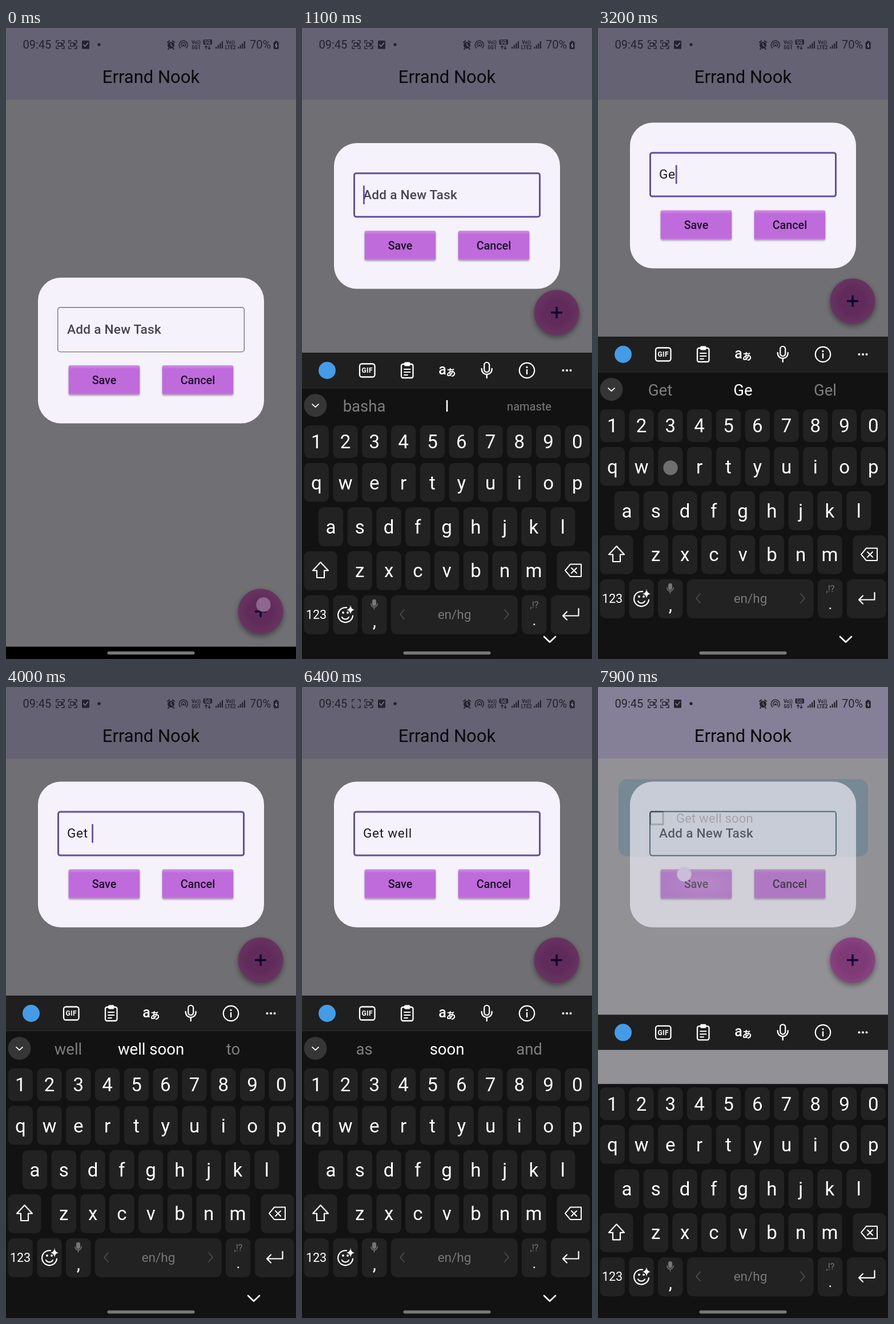
An HTML page for the animation above (8000 ms loop, 508 by 1102 pixels).

```html
<!DOCTYPE html>
<html lang="en">
<head>
<meta charset="utf-8">
<title>Add a task</title>
<style>
  html, body { margin: 0; width: 100%; height: 100%; overflow: hidden; background: #000; }
  svg { display: block; width: 508px; height: 1102px; font-family: Roboto, sans-serif; }
  .line { fill: none; stroke-linecap: round; stroke-linejoin: round; }
  .btn { filter: drop-shadow(0 2px 1.5px #0005); }
  .fab { filter: drop-shadow(0 4px 5px #0006); }
</style>
</head>
<body>
<svg id="stage" viewBox="0 0 508 1102"></svg>
<script>
const LOOP = 8000, STEP = 100;
const stage = document.getElementById('stage');

// Each list runs [time, value], in order of time.
const keyboardY = [[800, 1102], [900, 1058], [1000, 800], [1100, 567], [1200, 546], [1300, 539], [7800, 539], [7900, 572.3]];
const dialogY = [[900, 436], [1000, 325], [1100, 201], [1200, 174], [1300, 165.3]];
const fabY = [[800, 1019], [900, 923], [1000, 690], [1100, 497], [1200, 483], [1300, 477]];
const fading = [[7700, 0], [7800, 0.08], [7900, 0.255]];
const typed = [[0, ''], [2800, 'G'], [3200, 'Ge'], [3500, 'Get'], [3700, 'Get '], [5800, 'Get well '], [6700, 'Get well soon '], [7800, '']];
const hints = [
  [0, ['basha', 'I', 'namaste']], [1900, ['Basha', 'I', 'Namaste']],
  [2800, ['Good', 'G', 'Go']], [3200, ['Get', 'Ge', 'Gel']], [3500, ['Gets', 'Get', 'Getting']],
  [3700, ['well', 'well soon', 'to']], [5800, ['as', 'soon', 'and']], [6700, ['and', 'I', 'to']]
];
const cursorToggles = [700, 1200, 1800, 2200, 2800, 4200, 4900, 5200, 5800, 6400, 6700, 7200, 7700];
// Touches: start, end, x, y, colour
const taps = [
  [0, 200, 451, 1007, '#8f668d'], [700, 800, 255, 530, '#d5cfdf'],
  [1800, 1900, 32, 919], [2800, 2900, 254, 845], [3200, 3300, 127, 768],
  [3500, 3600, 228, 768], [3700, 3800, 267, 997], [5800, 5900, 109, 633],
  [6600, 6700, 254, 633], [7700, 8000, 151, 327, '#c9bdd9']
];

const latest = (list, t) => list.filter(e => e[0] <= t).pop()[1];

function tween(list, t) {
  const i = list.findIndex(e => e[0] > t);
  if (i < 0) return list[list.length - 1][1];
  if (i === 0) return list[0][1];
  const [t0, a] = list[i - 1], [t1, b] = list[i];
  return a + (b - a) * (t - t0) / (t1 - t0);
}

const box = (x, y, w, h, r, fill, more = '') =>
  `<rect x="${x}" y="${y}" width="${w}" height="${h}" rx="${r}" fill="${fill}" ${more}/>`;
const disc = (x, y, r, fill, more = '') => `<circle cx="${x}" cy="${y}" r="${r}" fill="${fill}" ${more}/>`;
const line = (d, color, width = 2.4) => `<path class="line" d="${d}" stroke="${color}" stroke-width="${width}"/>`;
const label = (s, x, y, size, fill, more = 'text-anchor="middle"') =>
  `<text xml:space="preserve" x="${x}" y="${y}" font-size="${size}" fill="${fill}" ${more}>${s}</text>`;
const group = (y, content, more = '') => `<g transform="translate(0 ${y})" ${more}>${content}</g>`;
const medium = 'text-anchor="middle" font-weight="500"';
const bold = 'text-anchor="middle" font-weight="700"';

function app(t) {
  const card = t < 7800 ? '' :
    box(36, 161, 437, 135, 15, '#c6e6f7') +
    box(92, 218, 22, 22, 1, 'none', 'stroke="#222" stroke-width="3"') +
    label('Get well soon', 137, 236.5, 22, '#222', 'letter-spacing=".2"');
  const fab = disc(446, 0, 39.7, 'url(#fab)', 'class="fab"') +
    '<path d="M446-10V10M436 0H456" stroke="#21005d" stroke-width="3.4"/>';
  return box(0, 0, 508, 1102, 0, '#f5f3fb') + box(0, 0, 508, 125, 0, '#ded7fc') +
    card + group(tween(fabY, t), fab);
}

function statusBar(t) {
  const ink = '#25232d', paper = '#77738a';
  const frame = (x, filled) =>
    line(`M${x} 26v-4h4M${x + 10} 22h4v4M${x + 14} 32v4h-4M${x + 4} 36h-4v-4`, ink, 1.5) +
    (filled ? `<path d="M${x + 3} 26h6v6h-6zM${x + 9} 29l3-2.5v5z" fill="none" stroke="${ink}" stroke-width="1.3"/>` : '');
  const bars = x => [0, 1, 2, 3].map(i => box(x + i * 3.6, 33 - i * 3.3, 2.2, 3 + i * 3.3, 0.5, ink)).join('');
  const tiny = (a, b, x) => label(a, x, 28, 8.5, ink, bold) + label(b, x, 36.5, 8.5, ink, bold);
  return label('09:45', 29.5, 36, 20, ink, '') +
    frame(88, t % 1000 < 400 || t % 1000 >= 900) + frame(110, true) +
    box(133, 22, 13, 14.5, 1.5, ink) + line('M136 29l2.5 3 5-6', paper, 1.7) + disc(163, 29, 2.7, ink) +
    disc(289, 30, 6, ink) + line('M283 25l3-2.5M295 25l-3-2.5M285 36l-1 1M293 36l1 1', ink, 2) + line('M289 26.5v4l2.5 1.5', paper, 1.3) +
    line('M305.5 35a7.5 7.5 0 1 1 10.5 0M308 32.5a4 4 0 1 1 5.5 0', ink, 1.5) + disc(310.8, 30.5, 1.8, ink) +
    tiny('Vo))', '5G1', 333) + box(345.5, 20, 15.5, 9, 2, ink) + label('5G', 353, 27.5, 8.5, paper, bold) +
    line('M350.5 37v-6l-2 2m2-2 2 2M356 31v6l-2-2m2 2 2-2', ink, 1.3) +
    bars(367) + tiny('Vo))', 'LTE2', 393) + bars(406) + label('70%', 427, 36, 20, ink, '') +
    box(471, 22.5, 4.5, 3, 1, ink) + box(468.7, 24, 9, 13, 2, ink) + line('M474 27l-2 4h3l-2 3', '#aaa6b8', 1.2) +
    label('Errand Nook', 254, 96, 31, '#09080c');
}

const pen = document.createElement('canvas').getContext('2d');
function advance(text) {
  pen.font = '22.6px Roboto, sans-serif';
  return pen.measureText(text).width + text.length * 0.7;
}

// The border grows inwards from a fixed outer edge.
function field(color, width) {
  return box(90 + width / 2, 51.3 + width / 2, 328 - width, 79 - width, 5 - width / 2, 'none',
    `stroke="${color}" stroke-width="${width}"`);
}

function dialog(t, fade) {
  const text = latest(typed, t);
  const focused = t >= 700 && t < 7800;
  const cursorOn = focused && cursorToggles.filter(e => e <= t).length % 2;
  const button = (s, x) => box(x, 153, 124.5, 51, 2.5, 'url(#button)', 'class="btn"') +
    label(s, x + 62.3, 185.5, 19.75, '#1d1029', medium);
  return box(56, 0, 396, 254.5, 40, '#f5f2fc') +
    (focused ? field('#634f9f', 3) : fade ? field('#395b6b', 2) : field('#77737c', 1.4)) +
    (text ? label(text, 107, 97.5, 22.6, '#1d1b20', 'letter-spacing=".7"')
          : label('Add a New Task', 107, 97.5, 22.6, '#49454f', 'font-weight="500" letter-spacing=".25"')) +
    (cursorOn ? box(107 + advance(text), 74, 2.8, 33, 1, '#6650a4') : '') +
    button('Save', 109.7) + button('Cancel', 273.7) +
    (t >= 7700 ? box(109.7, 153, 124.5, 51, 2.5, 'url(#ripple)') : '');
}

const mic = (x, y, s, color) => `<g transform="translate(${x} ${y}) scale(${s})">` +
  box(-4.5, -14, 9, 17, 4.5, color === '#fff' ? 'none' : color, `stroke="${color}" stroke-width="2.2"`) +
  line('M-9-3v1a9 9 0 0 0 18 0v-1M0 7v6', color) + '</g>';

function toolbar() {
  return box(0, 0, 508, 61.5, 0, '#1f1f1f') + disc(44, 31, 15, '#469be6') +
    box(101, 19.5, 26.5, 23, 4, 'none', 'stroke="#fff" stroke-width="2.3"') +
    label('GIF', 114.3, 35.3, 12, '#fff', bold + ' letter-spacing=".5"') +
    box(174, 20, 20.5, 24, 3, 'none', 'stroke="#fff" stroke-width="2.3"') + box(179, 16.5, 10.5, 7, 2, '#fff') +
    line('M179 29h10.5M179 34h10.5M179 39h6', '#fff', 1.9) +
    label('a', 246, 38, 25, '#fff', medium) +
    label('あ', 261, 40.5, 17, '#fff', bold + ' style="font-family:\'Noto Sans CJK JP\',\'Noto Sans CJK\',sans-serif"') +
    mic(323.7, 31, 1, '#fff') + disc(394, 31, 13.2, 'none', 'stroke="#fff" stroke-width="2.2"') +
    line('M394 30v7', '#fff') + disc(394, 25.3, 1.6, '#fff') +
    [457.5, 464, 470.5].map(x => disc(x, 31, 2, '#fff')).join('');
}

function suggestions(t) {
  const word = (s, i) => {
    const long = s.length === 7;
    return label(s, [109, 254, 398][i], long ? 101 : 103, long ? 20 : 27.5, i === 1 ? '#fff' : '#7e7e7e');
  };
  return box(0, 61.5, 508, 60, 0, '#121212') + disc(23.5, 92, 20, '#363636') +
    line('M18 90l5.5 5 5.5-5', '#eee', 1.8) + latest(hints, t).map(word).join('');
}

function keys(caps) {
  const plate = (x, y, w, h = 68) => box(x, y, w, h, 9.5, '#222');
  const row = (chars, x, y, h, base) => [...chars].map((c, i) => {
    const cx = x + i * 50.78;
    return plate(cx - 21.7, y, 43.4, h) + label(caps ? c.toUpperCase() : c, cx, base, 33, '#fff');
  }).join('');
  const shift = caps
    ? 'M32.5 366L46 380.5H39V388H26V380.5H19ZM26 393.5H39'
    : 'M32.5 366L46 380.5H39V393H26V380.5H19Z';
  return box(0, 121, 508, 600, 0, '#121212') +
    row('1234567890', 25.3, 127, 57, 167.4) + row('qwertyuiop', 25.3, 192.5, 68, 239) +
    row('asdfghjkl', 50.5, 270, 68, 315.5) + row('zxcvbnm', 101.3, 346.7, 68, 392) +
    plate(3.5, 346.7, 58) + line(shift, '#fff', 2.2) + plate(446.5, 346.7, 58) +
    line('M470 369.5h19v21.5h-19l-9-10.7zM472 376l9 9m0-9-9 9', '#fff', 2) +
    plate(3.5, 423.7, 43.4) + label('123', 25, 465, 21.5, '#fff') +
    plate(54.3, 423.7, 43.4) +
    line('M78 445.2a13 13 0 1 0 11 14.5M70 462a7 7 0 0 0 12 0', '#fff', 2.2) +
    disc(72, 454, 1.9, '#fff') + disc(80, 454, 1.9, '#fff') +
    '<path d="M85 441q1 7 7 8-6 1-7 8-1-7-7-8 6-1 7-8z" fill="#fff"/>' +
    plate(105, 423.7, 43.4) + mic(126.5, 440, 0.62, '#777') + label(',', 127, 479, 32, '#fff') +
    plate(156, 423.7, 221.5) + label('en/hg', 267, 464.5, 22.5, '#777') +
    line('M179 449l-7 8 7 8M355 449l7 8-7 8', '#4c4c4c', 1.8) +
    plate(385, 423.7, 43.4) + label(',!?', 407, 446, 16, '#777') + label('.', 407, 476, 26, '#fff') +
    plate(436, 423.7, 68.5) + line('M484.5 447v12.5H457m7-7-7 7 7 7', '#fff', 2.2);
}

const defs = `<defs>
  <radialGradient id="fab"><stop offset=".55" stop-color="#d35fc7"/><stop offset="1" stop-color="#e272d4"/></radialGradient>
  <linearGradient id="button" x2="0" y2="1"><stop stop-color="#d48fe8"/><stop offset=".13" stop-color="#bf6bdb"/>
    <stop offset=".93" stop-color="#bf6bdb"/><stop offset="1" stop-color="#c87fe0"/></linearGradient>
  <radialGradient id="ripple" cx=".6" r=".6"><stop stop-color="#fff" stop-opacity=".18"/><stop offset="1" stop-color="#fff" stop-opacity=".03"/></radialGradient>
</defs>`;

function scene(t) {
  const fade = tween(fading, t);
  const top = tween(keyboardY, t);
  const caps = t >= 1900 && t < 2900;
  const keyboard = top < 1102 ? toolbar() + (t < 7900 ? suggestions(t) : '') + keys(caps) : '';
  const dots = taps.filter(([from, to]) => t >= from && t < to)
    .map(([, , x, y, color = '#6f6f6f']) => disc(x, y, 12.7, color)).join('');
  return defs + app(t) + box(0, 0, 508, 1102, 0, '#000', `opacity="${0.54 * (1 - fade)}"`) + statusBar(t) +
    group(tween(dialogY, t), dialog(t, fade), `opacity="${1 - 1.4 * fade}"`) +
    box(0, 1080.5, 508, 22, 0, '#000') + group(top, keyboard) +
    (t >= 1000 && t < 7900 ? line('M424 1063l10 9.5 10-9.5', '#fff', 2.7) : '') +
    box(177.5, 1088.7, 153, 5.6, 2.8, '#787878') + dots;
}

let shown = -1;
function tick(now) {
  const t = Math.floor(now % LOOP / STEP) * STEP;
  if (t !== shown) stage.innerHTML = scene(shown = t);
  requestAnimationFrame(tick);
}
tick(performance.now());
</script>
</body>
</html>
```
